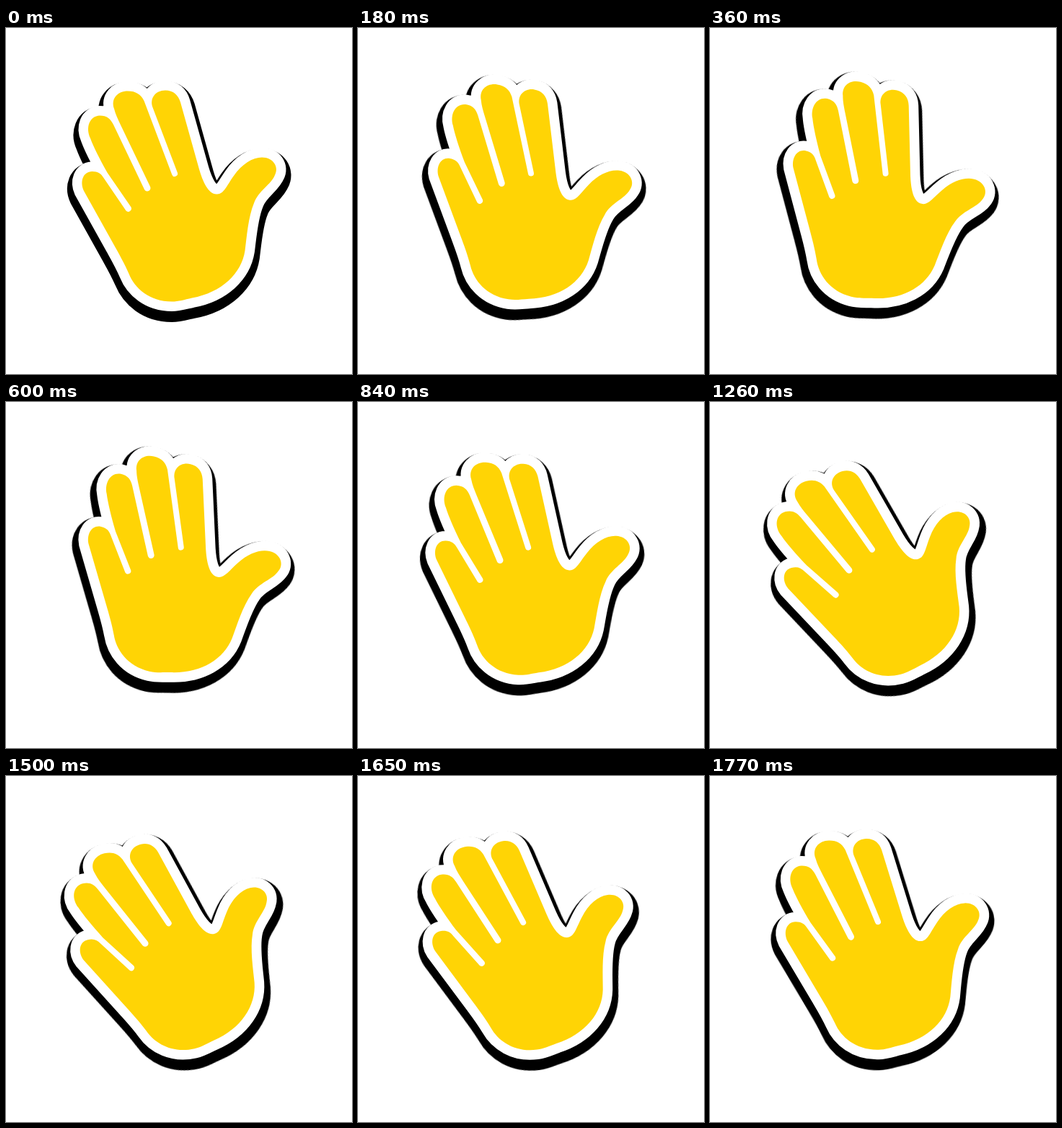
Animation of 480 by 480 pixels, one loop 1800 ms. Source, as an HTML page:

```html
<!DOCTYPE html>
<html lang="en">
<head>
<meta charset="utf-8">
<title>Waving hand</title>
<style>
  html, body { margin: 0; width: 100%; height: 100%; overflow: hidden; background: #fff; }
  svg { display: block; width: 100%; height: 100%; }
  .shadow { fill: #000; stroke: #000; stroke-width: 41; filter: blur(0.6px); }
  .border { fill: #fff; stroke: #fff; stroke-width: 27; }
  .skin { fill: #ffd405; }
</style>
</head>
<body>
<svg viewBox="0 0 480 480" stroke-linejoin="round">
  <defs>
    <path id="shape" d="
      M108 226
      C102 213 107 199 119.500 199 C127.500 199 132 202 135.500 208
      L166.5 253.4 A4.3 4.3 0 0 0 173.5 248.6 L140.6 200.8
      C130 182 121 164 117 153
      C110 138 116 122 130 121.500 C140 121.500 145 126 149 134
      L192 224 A4.3 4.3 0 0 0 200 220 L159 134.5
      C155 126 152 120 150 112
      C145 98 155 87.5 169 87.5 C180 87.5 187 92 191.500 101
      L230.3 203.4 A4 4 0 0 0 237.8 200.6 L203.800 111
      C198.500 98 207 86.5 221 86.5 C232 86.5 239 93 242 103
      L268 196
      C273 213 281 231.500 293 230.5 C302 230.5 306 219 316 205
      C327 189 342 179.5 355 179.5 C371 179.5 379 193 373 204
      C368 217 350 226 344 243 C336 262 334 290 331.5 309
      C326.5 341 299 367 258 374.5 C247 377 240 379.5 230 379.5
      C199 379.5 178.500 361 170.500 341 C164.500 327 156.500 313 151.500 304
      Z"/>
  </defs>
  <g id="hand">
    <use class="shadow" href="#shape" y="8"/>
    <use class="border" href="#shape"/>
    <use class="skin" href="#shape"/>
  </g>
</svg>
<script>
  const LOOP = 1800, STEP = 30, SWING = 15;
  const hand = document.getElementById('hand');
  const start = performance.now();

  function draw() {
    const time = Math.max(0, performance.now() - start) % LOOP;
    const held = Math.floor(time / STEP) * STEP;
    const angle = SWING * Math.sin(2 * Math.PI * held / LOOP);
    hand.setAttribute('transform', `rotate(${angle.toFixed(3)} 240 240)`);
    requestAnimationFrame(draw);
  }
  draw();
</script>
</body>
</html>
```
